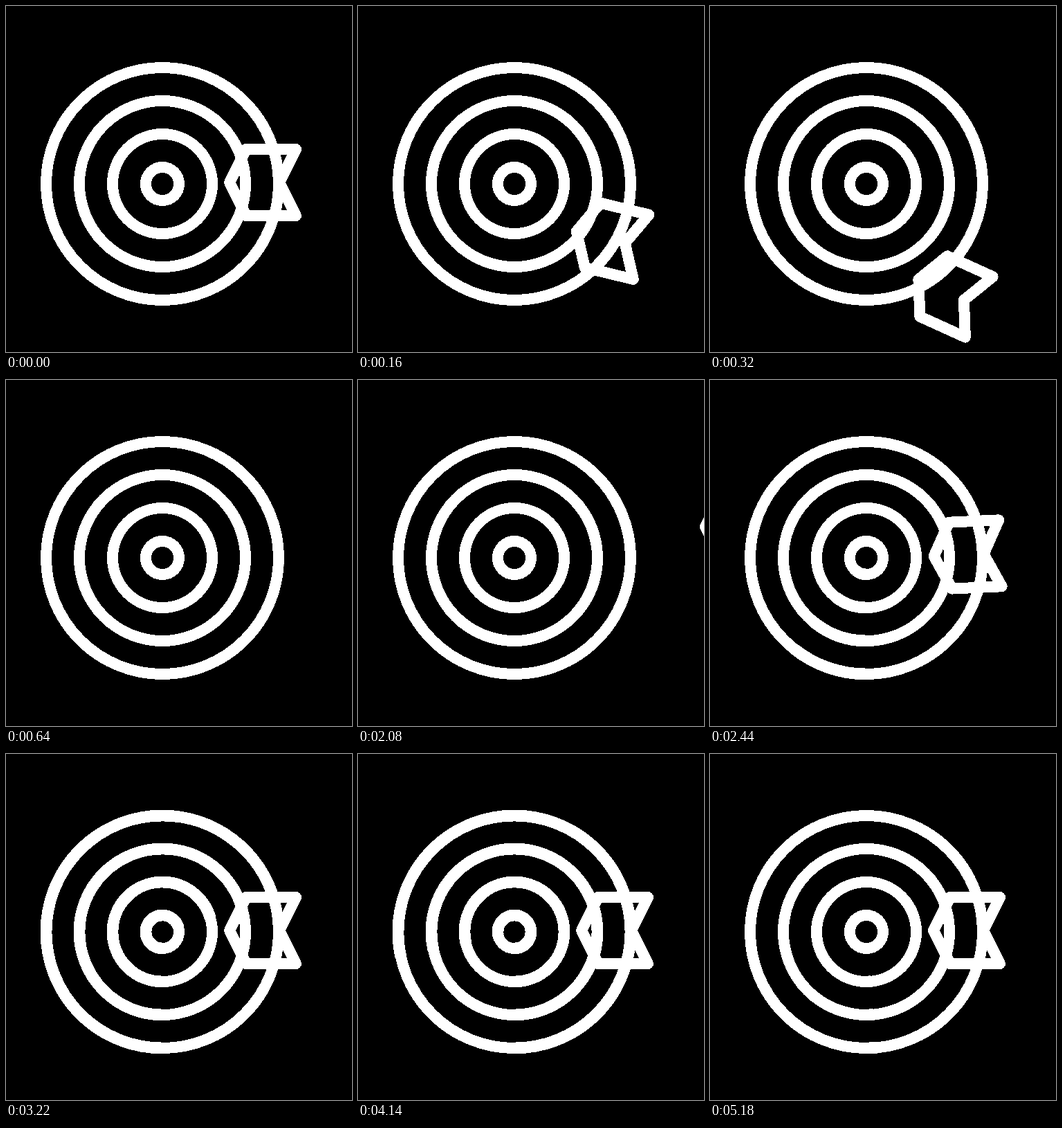
Recreate the animation shown at these times as an HTML page. Size 500 by 500 pixels, loop 5.2 s.

```html
<!DOCTYPE html>
<html lang="en">
<head>
<meta charset="utf-8">
<title>Target and dart</title>
<style>
  html, body { margin: 0; width: 100%; height: 100%; overflow: hidden; background: #000; }
  svg { display: block; width: 100vw; height: 100vh; }
  g { fill: none; stroke: #fff; stroke-width: 16; stroke-linejoin: round; shape-rendering: crispEdges; }
  #sweep { stroke-width: 16.8; }
</style>
</head>
<body>
<svg viewBox="0 0 500 500">
  <g id="rings"></g>
  <g id="sweep"></g>
  <g id="dart"><path d="M-60 0 L-36 -48 H36 L12 0 L36 48 H-36 Z"/></g>
</svg>
<script>
const LOOP = 5200, STEP = 20;
const FALL_END = 640, FLY_START = 2080, FLY_TIME = 380;
const REST = { x: 383, y: 255 };
const ENTRY = { x: 562, y: 212 };
const RING_COUNT = 4, RING_GAP = 48, INNER_RADIUS = 24;

const [rings, sweep, dart] = ['rings', 'sweep', 'dart'].map(id => document.getElementById(id));
const progress = (t, start, end) => Math.min(1, Math.max(0, (t - start) / (end - start)));

function addCircles(group) {
  for (let i = 0; i < RING_COUNT; i++) {
    const circle = document.createElementNS('http://www.w3.org/2000/svg', 'circle');
    circle.setAttribute('r', INNER_RADIUS + i * RING_GAP);
    circle.setAttribute('pathLength', 1);
    group.append(circle);
  }
  group.setAttribute('transform', 'translate(226 257) rotate(90)');
}

// The dart drops, drifting left and turning nose up.
function fall(t) {
  const u = t / (FALL_END / 2);
  return {
    x: REST.x - 27 * u ** 1.6,
    y: REST.y + 165 * u ** 0.96,
    angle: 24.5 * u ** 0.85
  };
}

// A new dart slows down along a shallow arc and levels out at rest.
function fly(t) {
  const p = progress(t, FLY_START, FLY_START + FLY_TIME);
  const left = 1 - p;
  return {
    x: REST.x + (ENTRY.x - REST.x) * left ** 2,
    y: REST.y + (ENTRY.y - REST.y) * left - 290 * p * left ** 2,
    angle: -16 * Math.sin(Math.PI * p)
  };
}

function render(t) {
  const { x, y, angle } = t < FALL_END ? fall(t) : fly(t);
  const away = t >= FALL_END && t < FLY_START;
  dart.setAttribute('visibility', away ? 'hidden' : 'visible');
  dart.setAttribute('transform', `translate(${x} ${y}) rotate(${angle})`);

  // A faint second stroke runs clockwise from the bottom, then clears the same way.
  const head = progress(t, 2300, 3600);
  const tail = progress(t, 3850, LOOP);
  sweep.setAttribute('visibility', head > tail ? 'visible' : 'hidden');
  sweep.setAttribute('stroke-dasharray', `0 ${tail} ${head - tail} 2`);
}

addCircles(rings);
addCircles(sweep);
const start = performance.now();
function tick() {
  const t = (performance.now() - start) % LOOP;
  render(Math.floor(t / STEP) * STEP);
  requestAnimationFrame(tick);
}
tick();
</script>
</body>
</html>
```
